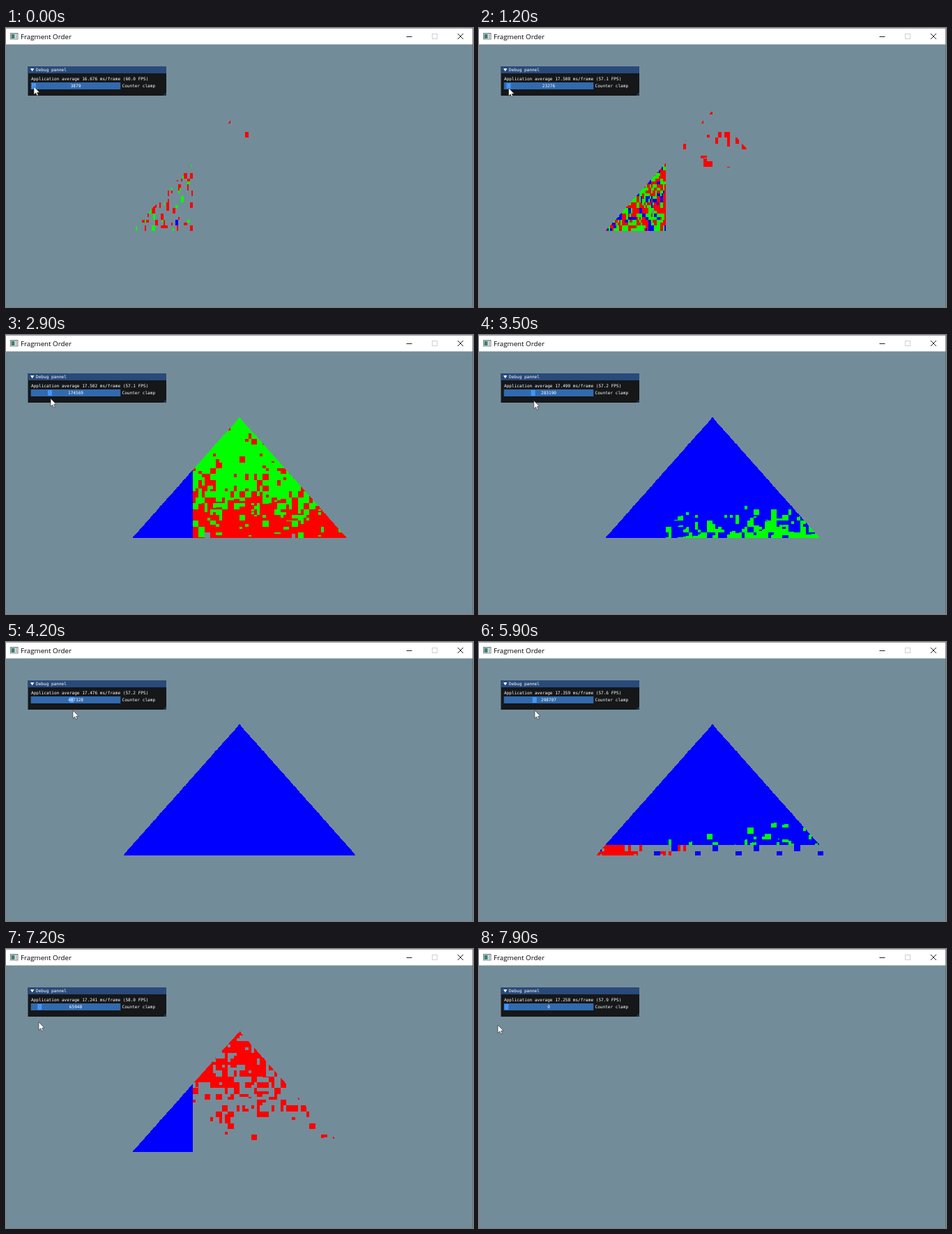
Animation, 670 px wide and 400 px high, one loop 8 s. Source, as an HTML page with a canvas:

```html
<!DOCTYPE html>
<html>
<head>
<meta charset="utf-8">
<title>Fragment Order</title>
<style>
html, body { margin: 0; width: 100%; height: 100%; overflow: hidden; }
canvas { display: block; }
</style>
</head>
<body>
<canvas id="stage" width="670" height="400"></canvas>
<script>
const ctx = document.getElementById('stage').getContext('2d');
const SCALE = 1280 / 670, TOP = 23.5;      // 1280x720 viewport shown 670 wide
const UNIT = 3879.316;                     // fragments per slider pixel
const BOX = { x: 166, y: 116, w: 338, h: 192 };
const END_LEFT = 47123, END_RIGHT = 293939, TOTAL = 345600;

// time, slider pixels, cursor x, cursor y, ms per rendered frame
const KEYS = [
  [0, 1, 40, 84, 16.676], [1200, 6, 42.5, 86, 17.508], [2900, 45, 64, 91, 17.502],
  [4200, 105, 96, 98, 17.476], [4700, 112, 99, 98, 17.43], [5900, 77, 80, 98, 17.359],
  [6700, 45, 62, 101, 17.226], [7500, 0, 38, 107, 17.25], [7900, 0, 27, 109, 17.258]
];

function stateAt(t) {
  let i = 0;
  while (i < KEYS.length - 2 && t >= KEYS[i + 1][0]) i++;
  const a = KEYS[i], b = KEYS[i + 1];
  const k = Math.min(1, (t - a[0]) / (b[0] - a[0]));
  return a.map((v, j) => v + (b[j] - v) * k);
}

function hash(x, y, seed) {
  let h = Math.imul(x + 101, 374761393) ^ Math.imul(y + 57, 668265263) ^ Math.imul(seed + 7, 1274126177);
  h = Math.imul(h ^ (h >>> 15), 2246822519);
  h = Math.imul(h ^ (h >>> 13), 3266489917);
  return ((h ^ (h >>> 16)) >>> 0) / 4294967296;
}

// Each 16px block is split into cells of one of these sizes.
const FINE = [[8, 16], [4, 8], [8, 8], [4, 16]];
const COARSE = [[16, 16], [8, 16], [16, 16], [8, 8]];

function cellNoise(x, y, pass, sizes) {
  const pick = hash(x >> 4, y >> 4, pass + 20);
  const [w, h] = sizes[Math.floor(pick * sizes.length)];
  return hash(Math.floor(x / w), Math.floor(y / h), pass + 3 * w + 50 * h);
}

const spread = r => 0.14 * ((2 * r - 1) ** 3 + r - 0.5);

// Counter value at which the red, green or blue triangle covers a pixel.
function coverTime(x, y, pass) {
  if (y >= 512) {
    const row = y >= 528 ? 1 : 0, col = x >> 4;
    const early = (col >= 30 && col % 7 === (row ? 2 : 5)) || (col === 20 && !row);
    if (early) return END_RIGHT - 9000;
    const noise = spread(cellNoise(x, y, pass, COARSE));
    const u = (pass + (x - 320) / 640) / 3 + 0.03 + noise * 0.6;
    return END_RIGHT + Math.min(u, 1) * (TOTAL - END_RIGHT);
  }
  if (x < 512) {
    const r = cellNoise(x, y, pass, FINE);
    return END_LEFT * [0.5 * r, 0.02 + 0.96 * r, r ** 0.38][pass];
  }
  const noise = spread(cellNoise(x, y, pass, COARSE));
  let u = (pass + ((y - 180) / 332) ** 1.7) / 3;
  u += pass === 2 ? noise * 0.5 + 0.04 * (x - 700) / 260 : noise;
  return END_LEFT + u * (END_RIGHT - END_LEFT);
}

const fragments = [];
for (let j = 0; j < BOX.h; j++) {
  for (let i = 0; i < BOX.w; i++) {
    const x = Math.floor((BOX.x + i + 0.5) * SCALE);
    const y = Math.floor((BOX.y + j + 0.5 - TOP) * SCALE);
    if (y < 540 && y - 180 >= Math.abs(x + 0.5 - 640) * 1.125) {
      fragments.push({ at: (j * BOX.w + i) * 4, times: [0, 1, 2].map(p => coverTime(x, y, p)) });
    }
  }
}

const image = ctx.createImageData(BOX.w, BOX.h);
const BACK = [115, 140, 153];

function drawTriangle(counter) {
  const d = image.data;
  for (let i = 0; i < d.length; i += 4) {
    d[i] = BACK[0]; d[i + 1] = BACK[1]; d[i + 2] = BACK[2]; d[i + 3] = 255;
  }
  if (counter > 0) {
    for (const { at, times } of fragments) {
      const top = counter > times[2] ? 2 : counter > times[1] ? 1 : counter > times[0] ? 0 : -1;
      if (top < 0) continue;
      for (let c = 0; c < 3; c++) d[at + c] = c === top ? 255 : 0;
    }
  }
  ctx.putImageData(image, BOX.x, BOX.y);
}

function rect(color, x, y, w, h) {
  ctx.fillStyle = color;
  ctx.fillRect(x, y, w, h);
}

function shape(color, points) {
  ctx.beginPath();
  points.forEach(([x, y]) => ctx.lineTo(x, y));
  ctx.closePath();
  ctx.fillStyle = color;
  ctx.fill();
}

function text(str, x, y, align = 'left') {
  ctx.font = '6.09px "DejaVu Sans Mono", monospace';
  ctx.fillStyle = '#fff';
  ctx.textAlign = align;
  ctx.fillText(str, x, y);
}

function line(color, ...points) {
  ctx.beginPath();
  for (const [x1, y1, x2, y2] of points) {
    ctx.moveTo(x1, y1);
    ctx.lineTo(x2, y2);
  }
  ctx.strokeStyle = color;
  ctx.lineWidth = 1;
  ctx.stroke();
}

function drawWindow() {
  rect('rgb(' + BACK + ')', 0, 0, 670, 400);
  rect('#fff', 0, 0, 670, 23.5);
  rect('#777', 0, 0, 670, 0.7);
  rect('#58676f', 669.3, 0, 0.7, 400);

  rect('#7d8489', 6, 7, 11.5, 9.5);
  rect('#fff', 7, 8.5, 9.5, 7);
  rect('#38806f', 7.5, 9, 5, 6);
  rect('#b9c4c8', 13.5, 9, 2.5, 6);

  ctx.font = '9.75px "Open Sans", "Noto Sans", sans-serif';
  ctx.fillStyle = '#000';
  ctx.textAlign = 'left';
  ctx.fillText('Fragment Order', 21, 15.5);

  line('#222', [574.5, 12.5, 582.5, 12.5], [648, 8, 656, 16], [656, 8, 648, 16]);
  ctx.strokeStyle = '#d0d0d0';
  ctx.strokeRect(611.5, 8.5, 7, 7);
}

function drawPanel(n, ms) {
  rect('#151719', 31.5, 55, 198.5, 42);
  rect('#294a7a', 31.5, 55, 198.5, 10);
  shape('#fff', [[35, 58], [40.4, 58], [37.7, 62.3]]);
  text('Debug pannel', 43, 62.3);
  text(`Application average ${ms.toFixed(3)} ms/frame (${(1000 / ms).toFixed(1)} FPS)`, 36, 75);
  rect('#316aae', 35.7, 78, 128.6, 10);
  rect('#4296fa', 36.4 + n / SCALE, 79, 6, 8);
  text(Math.round(n * UNIT), 100, 85.3, 'center');
  text('Counter clamp', 166.5, 85.3);
  shape('#1f344f', [[230, 92], [230, 97], [225, 97]]);
}

function drawCursor(x, y) {
  const arrow = [[0, 0], [0, 11.5], [2.7, 9], [4.5, 13], [6.3, 12.2], [4.6, 8.4], [8, 8.2]];
  shape('#fff', arrow.map(([dx, dy]) => [x + dx, y + dy]));
  ctx.strokeStyle = '#222';
  ctx.lineWidth = 0.6;
  ctx.stroke();
}

function draw() {
  const t = Math.floor(performance.now() % 8000 / 100) * 100;
  const [, pixels, x, y, ms] = stateAt(t);
  const n = Math.round(pixels);
  drawWindow();
  drawTriangle(n * UNIT);
  drawPanel(n, ms);
  drawCursor(x, y);
  requestAnimationFrame(draw);
}
draw();
</script>
</body>
</html>
```
